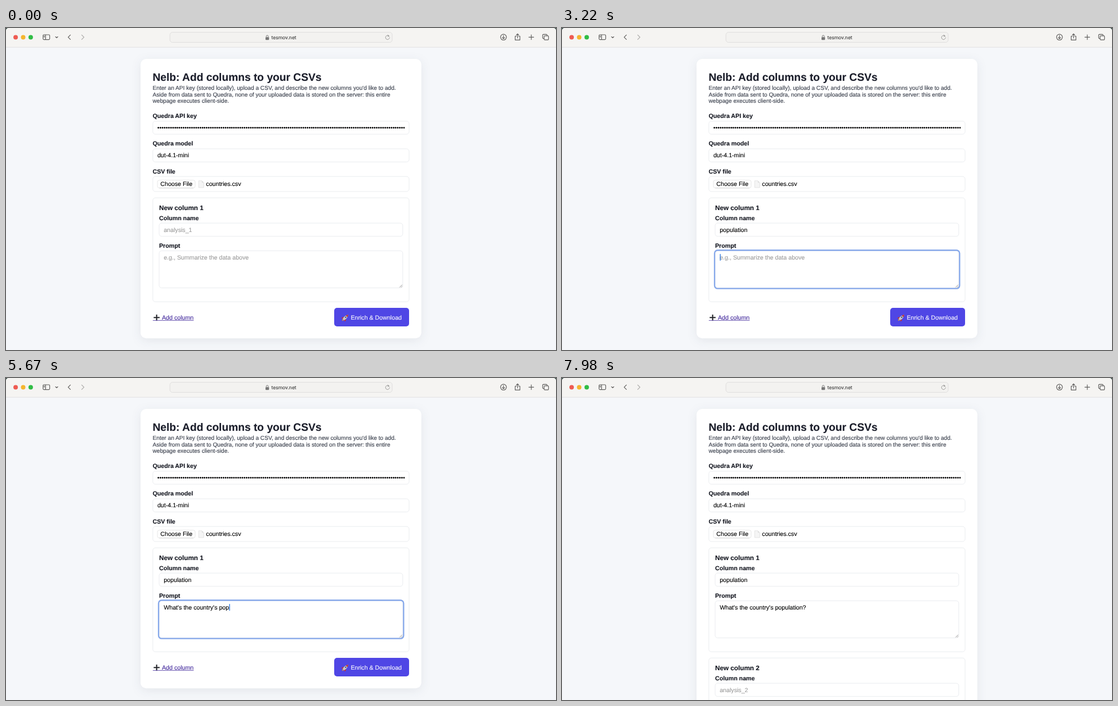
These frames come from a looping animation (977 px wide and 573 px high, 8000 ms). An HTML page:

```html
<!DOCTYPE html>
<html lang="en">
<head>
<meta charset="utf-8">
<title>Add columns to your CSVs</title>
<style>
  html, body { margin: 0; width: 100%; height: 100%; overflow: hidden; background: #f5f7fa; }
  svg { display: block; }
  text {
    font: 10.667px "Liberation Sans", Arial, sans-serif;
    color: #000; fill: currentColor; stroke: currentColor; stroke-width: .12;
    white-space: pre; text-rendering: geometricPrecision;
  }
  .label { font-weight: 700; color: #141720; }
  .head { font-weight: 700; font-size: 11.733px; color: #141720; }
  .title { font-weight: 700; font-size: 19.2px; color: #1b1e2b; }
  .intro { font-size: 10.133px; color: #343a47; }
  .address { font: 8.5px Inter, sans-serif; color: #3b3b3b; }
  .hint { color: #9c9c9c; }
  .action { color: #fff; }
  .field { fill: #fff; stroke: #e5e7eb; stroke-width: .8; }
  .ring { fill: none; stroke: #86a8ea; stroke-width: 2.3; visibility: hidden; }
  .icon { fill: none; stroke: #5d5c5b; stroke-width: 1.15; stroke-linecap: round; stroke-linejoin: round; }
  #link text { color: inherit; }
  #card { filter: drop-shadow(0 4px 9px rgba(25, 35, 60, .08)); }
</style>
</head>
<body>
<svg id="stage" width="977" height="573" viewBox="0 0 977 573"></svg>
<script>
const LOOP = 8000, TICK = 70;
const NAME = "population";
const PROMPT = "What's the country's population?";
const HINT = "e.g., Summarize the data above";
const FOCUS_NAME = 490, FOCUS_PROMPT = 3220, HOVER = 7420, ADDED = 7980;
const TEXT_X = 280.2;

const run = (start, count) => Array.from({ length: count }, (_, i) => start + i * TICK);
const nameKeys = [1960, ...run(2170, 2), 2520, ...run(2730, 4), 3080, 3080];
const promptKeys = [
  3570, 3710, 3710, 3850, ...run(3990, 4), ...run(4200, 8), ...run(4830, 2),
  ...run(5180, 3), 5460, ...run(5600, 2), 5950, ...run(6090, 2), ...run(6300, 4), 6790
];
// A blink fades out in three ticks, and back in 350 ms after it began
const blinks = [1050, 7490];

const text = (x, y, str, cls = "", id = "") => `<text x="${x}" y="${y}" class="${cls}" id="${id}">${str}</text>`;
const box = (x, y, w, h, r, cls, id = "") =>
  `<rect x="${x}" y="${y}" width="${w}" height="${h}" rx="${r}" class="${cls}" id="${id}"/>`;
const icon = (d, extra = "") => `<path class="icon" d="${d}" ${extra}/>`;
const dot = (x, color) => `<circle cx="${x}" cy="16.5" r="4" fill="${color}"/>`;

const panel = n => `
  ${box(260.8, 302.2, 455.2, 185, 4.5, "field")}
  ${text(272, 323.8, "New column " + n, "head")}
  ${text(272, 341.8, "Column name", "label")}
  ${box(272, 347.2, 432.8, 23.5, 4.5, "field")}
  ${text(TEXT_X, 362.5, "analysis_" + n, "hint", "name" + n)}
  ${text(272, 391, "Prompt", "label")}
  ${box(272, 396.5, 432.8, 66, 4.5, "field")}
  ${text(TEXT_X, 411.7, HINT, "hint", "prompt" + n)}
  <path d="M699.2 461.5l4.6-4.6M702 461.5l1.8-1.8" stroke="#777" stroke-width=".8"/>`;

const toolbar = `
  <rect width="977" height="34.2" fill="#f5f4f2"/>
  <rect y="33.8" width="977" height=".8" fill="#dedddc"/>
  <path d="M0 0h4.5Q0 0 0 4.5zM977 0h-4.5Q977 0 977 4.5z" fill="#203a35"/>
  ${dot(17.1, "#ee5b52")}${dot(30.5, "#f5b52e")}${dot(43.9, "#30bd45")}
  ${icon("M67.3 12h8.8q1.5 0 1.5 1.5v5.6q0 1.5-1.5 1.5h-8.8q-1.5 0-1.5-1.5v-5.6q0-1.5 1.5-1.5zM70.3 12v8.6M67.2 14.2h1.5M67.2 16h1.5")}
  ${icon("M88 15.5l2 2 2-2")}
  ${icon("M114.4 12.4l-4 4 4 4")}
  ${icon("M134.5 12.4l4 4-4 4", 'opacity=".5"')}
  <rect x="291.2" y="7.6" width="394.8" height="18" rx="4.5" fill="#f3f2f0" stroke="#dad9d8" stroke-width=".8"/>
  <rect x="461" y="16.2" width="6.2" height="5" rx="1" fill="#777"/>
  <path d="M462.3 16.3v-1.5a1.8 1.8 0 0 1 3.6 0v1.5" fill="none" stroke="#777"/>
  ${text(471.5, 19.8, "tesmov.net", "address")}
  ${icon("M680.6 14.6a3.6 3.6 0 1 0 .8 2.4M678.3 12.2l2.3 2.3-2.4.6", 'opacity=".7" style="stroke-width:.8"')}
  <circle class="icon" cx="883.7" cy="16.3" r="5.2"/>
  ${icon("M883.7 13.3v5.6M881.5 16.9l2.2 2.2 2.2-2.2")}
  ${icon("M906.7 14.5h-2.2v6.8h8.4v-6.8h-2.2M908.7 18v-7.3M906.6 12.5l2.1-2.1 2.1 2.1")}
  ${icon("M928.8 16.3h8.6M933.1 12v8.6")}
  ${icon("M955.9 18.6h-1.3q-1.3 0-1.3-1.3v-4.6q0-1.3 1.3-1.3h5.2q1.3 0 1.3 1.3v1.1M957.2 13.9h5.2q1.3 0 1.3 1.3v4.6q0 1.3-1.3 1.3h-5.2q-1.3 0-1.3-1.3v-4.6q0-1.3 1.3-1.3z")}`;

const form = `
  ${text(260.5, 93.7, "Nelb: Add columns to your CSVs", "title")}
  ${text(260.5, 110.4, "Enter an API key (stored locally), upload a CSV, and describe the new columns you'd like to add.", "intro")}
  ${text(260.5, 121.7, "Aside from data sent to Quedra, none of your uploaded data is stored on the server: this entire", "intro")}
  ${text(260.5, 133, "webpage executes client-side.", "intro")}
  ${text(260.5, 160.2, "Quedra API key", "label")}
  ${box(260.8, 165.8, 455.2, 23.2, 4.5, "field")}
  <clipPath id="keyClip"><rect x="268" y="166" width="440.2" height="22"/></clipPath>
  <g clip-path="url(#keyClip)">${text(268.8, 181, "•".repeat(118))}</g>
  ${text(260.5, 209.4, "Quedra model", "label")}
  ${box(260.8, 215, 455.2, 23.4, 4.5, "field")}
  ${text(268.9, 230.3, "dut-4.1-mini")}
  ${text(260.5, 258.7, "CSV file", "label")}
  ${box(260.8, 264.2, 455.2, 26.8, 4.5, "field")}
  <rect x="269" y="270.8" width="67" height="13.8" rx="3.3" fill="#fff" stroke="#dcdcdc" stroke-width=".7"/>
  <path d="M272 284.9h61" stroke="#c4c4c4" stroke-width=".6"/>
  ${text(274.3, 281.4, "Choose File")}
  <path d="M342.3 271.8h5.6l3.4 3.4v8.8h-9z" fill="#f5f5f5" stroke="#d6d6d6" stroke-width=".6"/>
  <path d="M347.9 271.8v3.4h3.4z" fill="#dedede"/>
  ${text(355.3, 281.4, "countries.csv")}`;

const rocket = `
  <g transform="translate(602.8 515.3) rotate(45)">
    <path d="M-1.5 4.5L0 8.4 1.5 4.5z" fill="#f9a825"/>
    <path d="M-1.8 .5L-4.2 3v3l2.4-1.6h3.6L4.2 6V3L1.8 .5z" fill="#c5352f"/>
    <path d="M0-7.3Q4-1.5 1.8 4.8h-3.6Q-4-1.5 0-7.3z" fill="#c3c6d0"/>
    <path d="M0-7.3Q1.6-5.1 2.1-3.2h-4.2Q-1.6-5.1 0-7.3z" fill="#c5352f"/>
    <circle cy="-.9" r="1.2" fill="#35475f"/>
  </g>`;

const actions = `
  <g id="actions">
    <g id="link">
      <path d="M262.3 515.3h10.6M267.6 510v10.6" stroke="#25262b" stroke-width="2.1"/>
      ${text(277, 519.2, "Add column")}
      <rect x="260.8" y="519.9" width="72.6" height=".8" fill="currentColor"/>
    </g>
    <rect x="583" y="498" width="133" height="33" rx="5" fill="#4f46e5"/>
    ${rocket}
    ${text(612.4, 519.2, "Enrich &amp; Download", "action")}
  </g>`;

document.getElementById("stage").innerHTML = `
  <rect width="977" height="573" fill="#f5f7fa"/>
  <rect id="card" x="239" y="55" width="498.8" height="497.3" rx="10" fill="#fff"/>
  ${toolbar}${form}${panel(1)}
  ${box(271, 346.3, 435.3, 25.8, 5.4, "ring", "nameRing")}
  ${box(271, 395.5, 435.3, 68.2, 5.4, "ring", "promptRing")}
  <rect id="caret" width="1.3" height="11.8" fill="#2673dc"/>
  ${actions}
  <g id="second" transform="translate(0 196)">${panel(2)}</g>`;

const el = id => document.getElementById(id);
const show = (id, on) => { el(id).style.visibility = on ? "visible" : "hidden"; };
const typed = (str, keys, t) => str.slice(0, keys.filter(k => k <= t).length);

function fill(id, value, hint) {
  el(id).textContent = value || hint;
  el(id).setAttribute("class", value ? "" : "hint");
}

function caretOpacity(t) {
  const start = blinks.find(b => t >= b && t < b + 7 * TICK);
  if (start === undefined) return 1;
  const tick = Math.floor((t - start) / TICK);
  return tick < 5 ? Math.max(0, (2 - tick) / 3) : (tick - 4) / 3;
}

function draw(t) {
  const name = typed(NAME, nameKeys, t);
  const prompt = typed(PROMPT, promptKeys, t);
  const onPrompt = t >= FOCUS_PROMPT;
  const added = t >= ADDED;
  const value = onPrompt ? prompt : name;

  fill("name1", name, "analysis_1");
  fill("prompt1", prompt, HINT);
  show("nameRing", t >= FOCUS_NAME && !onPrompt);
  show("promptRing", onPrompt && !added);

  const caret = el("caret");
  const width = value ? el(onPrompt ? "prompt1" : "name1").getComputedTextLength() : 0;
  caret.setAttribute("x", TEXT_X + .3 + width);
  caret.setAttribute("y", onPrompt ? 402.2 : 353);
  caret.setAttribute("opacity", caretOpacity(t));
  show("caret", t >= FOCUS_NAME && !added);

  el("link").style.color = t >= HOVER ? "#4f46e5" : "#42289c";
  el("card").setAttribute("height", added ? 700 : 497.3);
  show("actions", !added);
  show("second", added);
}

const origin = performance.now();
function frame() {
  draw((performance.now() - origin) % LOOP);
  requestAnimationFrame(frame);
}
frame();
</script>
</body>
</html>
```
